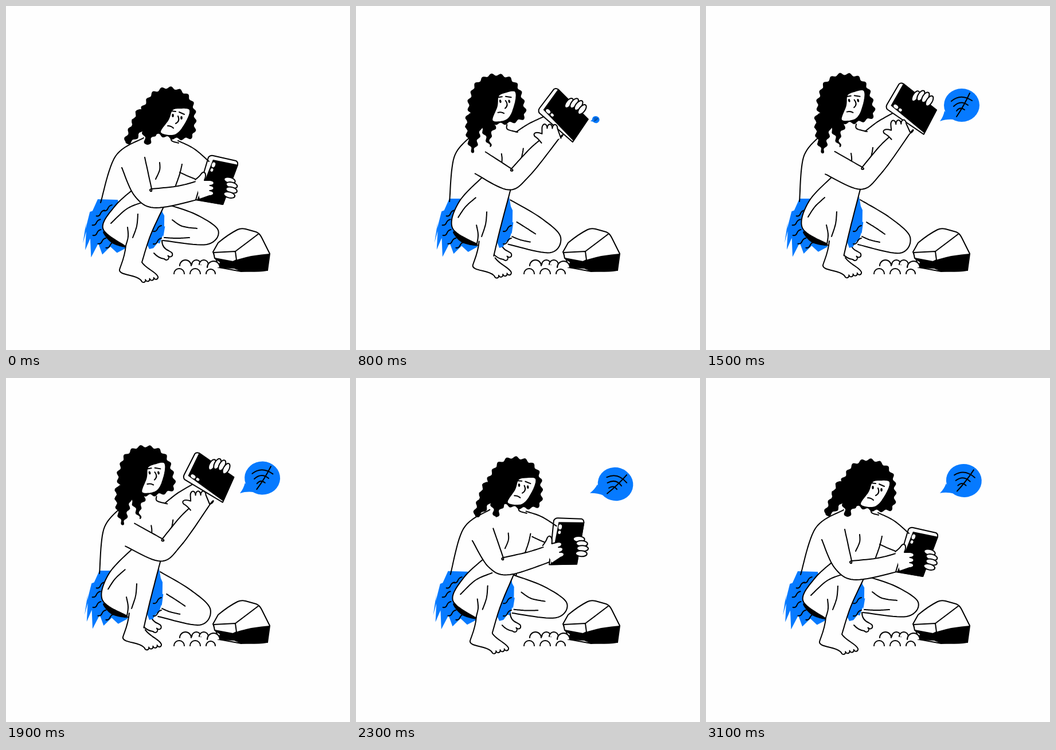
Recreate the animation shown at these times as an HTML page. Size 600 by 600 pixels, loop 3.2 s.

```html
<!DOCTYPE html>
<html lang="en">
<head>
<meta charset="utf-8">
<title>Reader looking for a signal</title>
<style>
  html, body { margin: 0; width: 100%; height: 100%; overflow: hidden; background: #fefefe; }
  svg { display: block; width: 100vw; height: 100vh; }
  .line { fill: none; stroke: #000; stroke-width: 2; stroke-linecap: round; stroke-linejoin: round; }
  .skin { fill: #fefefe; }
  .ink { fill: #000; }
  .blue { fill: #067aff; }
</style>
</head>
<body>
<svg viewBox="0 0 600 600">
  <g id="back"></g>
  <g id="farFoot"></g>
  <g id="legs"></g>
  <g id="foot"></g>
  <g id="torso"></g>
  <g id="book">
    <path class="line skin" d="M353 264Q356 260 361 261L401 270Q405 272 404 277L378 346 331 338Z"/>
    <path class="ink" d="M361 268L405 277 379 347 333 339Z"/>
    <ellipse class="skin" cx="362" cy="277" rx="3" ry="4.5" transform="rotate(20 362 277)"/>
    <ellipse class="skin" cx="359" cy="286" rx="2.4" ry="3" transform="rotate(20 359 286)"/>
  </g>
  <g id="arm"></g>
  <g id="hand"></g>
  <g id="locks"></g>
  <g id="head"></g>
  <g id="scene">
    <path class="line skin" d="M361 429L370 413Q388 398 404 390Q410 387 418 389L436 394Q442 396 446 404L460 432 456 461 410 463 372 456Z"/>
    <path class="ink" d="M364 441L397 446 404 442Q430 434 460 432L456 461Q450 465 410 463L398 458 369 457 373 447Z"/>
    <path class="line skin" d="M362 430L400 428 402 443 396 446 364 440Z"/>
    <path class="line" d="M441 397Q424 410 400 428"/>
  </g>
  <g id="bubble">
    <path class="blue" d="M408 201Q414 193 416 183L432 198Q419 197 408 201Z"/>
    <ellipse class="blue" cx="446" cy="173" rx="31" ry="29"/>
    <path class="line" d="M428 166Q444 152 464 165M432 175Q444 163 457 173M437 183Q443 175 451 181M460 152Q450 174 437 193"/>
  </g>
</svg>
<script>
const $ = id => document.getElementById(id);
const mix = (a, b, k) => a + (b - a) * k;
const noise = i => Math.abs(Math.sin(i * 12.9898) * 43758.5) % 1;
const parse = text => text.split(' ').map(p => p.split(',').map(Number));
const morphs = [];

function add(layer, tag, attrs) {
  const node = document.createElementNS('http://www.w3.org/2000/svg', tag);
  for (const key in attrs) node.setAttribute(key, attrs[key]);
  return $(layer).appendChild(node);
}

// Points of a smooth curve; a doubled key point makes a corner.
function spline(keys, closed) {
  const n = keys.length, out = [];
  const at = i => keys[closed ? (i + n) % n : Math.max(0, Math.min(n - 1, i))];
  for (let i = 0; i < (closed ? n : n - 1); i++) {
    const [p, q, r, s] = [at(i - 1), at(i), at(i + 1), at(i + 2)];
    for (let u = 0; u < 1; u += 1 / 12)
      out.push(q.map((v, k) => v + u / 2 * (r[k] - p[k] + u * (2 * p[k] - 5 * v + 4 * r[k] - s[k] + u * (3 * (v - r[k]) + s[k] - p[k])))));
  }
  if (!closed) out.push(keys[n - 1]);
  return out;
}
const trace = points => 'M' + points.map(p => p.map(v => v.toFixed(1))).join('L');
const open = keys => trace(spline(keys));
const loop = keys => trace(spline(keys, true)) + 'Z';

// Closed outline with curls of even length.
function curly(keys) {
  const points = spline(keys, true), n = points.length;
  const step = i => {
    const [a, b] = [points[i], points[(i + 1) % n]];
    return [b[0] - a[0], b[1] - a[1], Math.hypot(b[0] - a[0], b[1] - a[1]) || 1e-6];
  };
  const total = points.reduce((sum, _, i) => sum + step(i)[2], 0);
  const curls = Math.round(total / 16);
  let run = 0;
  return trace(points.map((p, i) => {
    const [dx, dy, length] = step(i);
    const push = 2.2 * Math.cos(2 * Math.PI * curls * run / total);
    run += length;
    return [p[0] + dy / length * push, p[1] - dx / length * push];
  })) + 'Z';
}

// Torn edge along a quadratic curve; the remaining points close the cloth.
const torn = (teeth, depth) => ([a, b, c, ...rest]) => {
  const edge = Array.from({ length: 2 * teeth + 1 }, (_, i) => {
    const t = i / (2 * teeth);
    const drop = i % 2 * depth * Math.sin(Math.PI * t) * (.55 + .45 * noise(i));
    return [0, 1].map(k => mix(mix(a[k], b[k], t), mix(b[k], c[k], t), t) + (k ? drop : -drop / 6));
  });
  return trace([...edge, ...rest]) + 'Z';
};

// Row of rounded bumps for toes and fingers.
function bumps([x, y], [x2, y2], count, depth) {
  const dx = (x2 - x) / count, dy = (y2 - y) / count;
  const angle = Math.atan2(dy, dx) * 180 / Math.PI;
  const sweep = depth > 0 ? 1 : 0;
  return `L${x} ${y}` + `a${Math.hypot(dx, dy) / 2} ${Math.abs(depth)} ${angle} 0 ${sweep} ${dx} ${dy}`.repeat(count);
}

// A shape that moves from the crouched pose to the raised pose.
function shape(layer, style, low, high, draw = open) {
  const reach = layer === 'arm' ? .06 : 0;
  morphs.push({ node: add(layer, 'path', { class: style }), a: parse(low), b: parse(high), draw, reach });
}
const line = (layer, low, high) => shape(layer, 'line', low, high);

// Far leg
line('back', '274,344 330,363 370,391 350,416 274,409', '269,338 322,370 356,403 338,431 265,416');
line('back', '290,373 307,384 333,388', '280,377 296,387 312,398');
line('back', '276,404 298,405 320,404', '272,402 286,408 303,412');
add('farFoot', 'path', { class: 'line skin', d: 'M272 409Q272 422 284 427' + bumps([289, 430], [276, 441], 2, 5) + 'Q266 440 258 431' });

// Loincloth
shape('legs', 'blue', '160,337 100,420 210,422 195,338', '163,336 103,420 212,420 195,336', torn(7, 42));
shape('legs', 'blue', '270,345 292,400 250,424 238,400', '267,332 288,396 250,422 238,390', torn(5, 15));
const fold = (x, y) => add('legs', 'path', { class: 'line', d: `M${x - 7} ${y + 5}q5 1 7 -4t7 -6` });
for (let i = 0; i < 6; i++) {
  const angle = 1.7 + i * .55;
  fold(185 + 28 * Math.cos(angle), 384 + 33 * Math.sin(angle));
}
for (const y of [388, 410]) fold(264, y);
shape('legs', 'ink', '170,393 209,410 210,421 184,413', '170,393 211,409 212,418 184,412', loop);

// Near leg and foot
shape('legs', 'line skin',
  '237,447 252,400 276,348 276,348 224,318 224,318 190,349 169,388 208,419',
  '240,437 252,386 270,316 270,316 224,294 224,294 180,340 168,387 211,415');
add('foot', 'path', { class: 'line skin', d: 'M209 418C207 440 200 452 198 460C197 470 225 468 234 477' + bumps([236, 479], [265, 472], 4, -4) + 'C262 464 244 458 237 447' });
line('torso', '230,363 228,384 221,404', '228,359 226,380 219,402');
line('torso', '243,341 212,353 183,379', '207,334 190,350 178,368');
line('torso', '212,386 213,402 209,418', '210,382 213,399 211,415');

// Torso and far arm
line('torso', '240,230 191,262 165,343', '197,228 170,264 163,341');
line('torso', '288,227 289,235 301,239', '262,206 263,214 281,219');
line('torso', '268,273 268,286 261,302', '253,257 254,264 254,272');
line('torso', '307,276 303,293 296,313', '291,247 290,254 288,263');
line('arm', '300,235 328,249 354,271', '278,219 300,203 326,189');
line('arm', '303,290 318,297 336,304', '330,205 336,208 342,212');
$('book').before($('arm').cloneNode());

// Near arm and hand
shape('arm', 'line skin',
  '242,264 254,319 254,319 300,314 338,304 338,304 345,335 345,335 262,352 225,332 202,282',
  '225,254 272,282 272,282 303,246 325,226 325,226 356,224 356,224 304,294 268,320 208,293');
add('hand', 'path', { class: 'line skin', d: 'M330 303Q338 297 341 292C346 287 351 292 346 304' + bumps([356, 304], [355, 331], 3, 7) + 'L338 337' });

// Fingers holding the far side of the book
for (let i = 0; i < 4; i++) {
  const [x, y] = [390 + 4 * Math.sin(i * 1.1), 304 + 8.5 * i];
  add('book', 'ellipse', { class: 'line skin', cx: x, cy: y, rx: 10, ry: 5, transform: `rotate(14 ${x} ${y})` });
}

// Head
shape('locks', 'ink', '233,178 216,212 207,239 226,232 242,205', '193,188 192,225 203,255 212,235 216,203', curly);
shape('locks', 'ink', '236,200 240,225 246,244 257,228 270,212', '213,200 222,222 233,246 234,226 242,205', curly);
const still = (style, keys, draw = open) => add('head', 'path', { class: style, d: draw(parse(keys)) });
still('ink', '257,151 283,142 311,151 326,170 330,195 328,222 318,231 290,231 262,224 242,222 234,188 246,164', curly);
still('line skin', '290,181 304,178 320,180 318,195 303,219 288,226 269,220 283,198', loop);
add('head', 'path', { class: 'line', d: 'M287 183l9 1M302 185l9 4M300 192q4 9 -4 13M282 209q6 0 10 4' });
for (const [x, y] of [[291, 191], [306, 195]]) add('head', 'ellipse', { class: 'ink', cx: x, cy: y, rx: 1.8, ry: 3 });

// Stones
for (const [x, y, r] of [[313, 453, 10], [332, 451, 8], [345, 451, 8], [362, 456, 11], [302, 467, 9], [330, 467, 9], [357, 467, 8]])
  add('scene', 'path', { class: 'line skin', d: `M${x - r} ${y}a${r} ${r} 0 0 1 ${2 * r} 0` });

const ease = (from, to, t) => {
  const u = Math.max(0, Math.min(1, (t - from) / (to - from)));
  return u * u * (3 - 2 * u);
};
function place(id, from, to, k, angle, shift = [0, 0]) {
  const [x, y] = from.map((v, i) => mix(v, to[i], k) + shift[i]);
  $(id).setAttribute('transform', `translate(${x} ${y}) rotate(${angle}) translate(${-from[0]} ${-from[1]})`);
}

function render(t) {
  const up = ease(400, 800, t) * .95 + ease(800, 1100, t) * .05 - ease(1850, 2450, t);
  const lean = ease(1200, 1900, t) - ease(1900, 2300, t) - .2 * (ease(2400, 2700, t) - ease(2700, 3000, t));
  for (const m of morphs) {
    const k = up + lean * m.reach;
    m.node.setAttribute('d', m.draw(m.a.map((p, i) => p.map((v, j) => mix(v, m.b[i][j], k)))));
  }
  place('book', [368, 303], [361, 183], up, -69 * up - 8 * lean, [-8 * lean, -13 * lean]);
  place('hand', [345, 316], [336, 219], up, -95 * up, [-2 * lean, -6 * lean]);
  place('head', [298, 193], [257, 165], up, -15 * up);
  place('foot', [209, 418], [215, 410], up, 0);
  place('farFoot', [272, 409], [252, 410], up, 0);

  // The bubble pops out with an overshoot, then swings about its tip.
  const grown = Math.max(0, (t - 700) / 500);
  const size = t < 1200 ? 1.15 * Math.sin(Math.PI / 2 * grown) ** 1.45 : 1.15 - .15 * ease(1200, 1450, t);
  const swing = t > 1770 ? 8.5 * (1 - Math.cos(2 * Math.PI * (t - 1770) / 1060)) : 20 * (1 - ease(800, 1200, t));
  $('bubble').setAttribute('visibility', t > 700 ? 'visible' : 'hidden');
  $('bubble').setAttribute('transform', `translate(409 201) rotate(${swing}) scale(${size}) translate(-409 -201)`);
}

const start = performance.now();
function tick() {
  const time = Math.max(0, performance.now() - start) % 3200;
  render(Math.floor(time / 100) * 100);
  requestAnimationFrame(tick);
}
tick();
</script>
</body>
</html>
```
